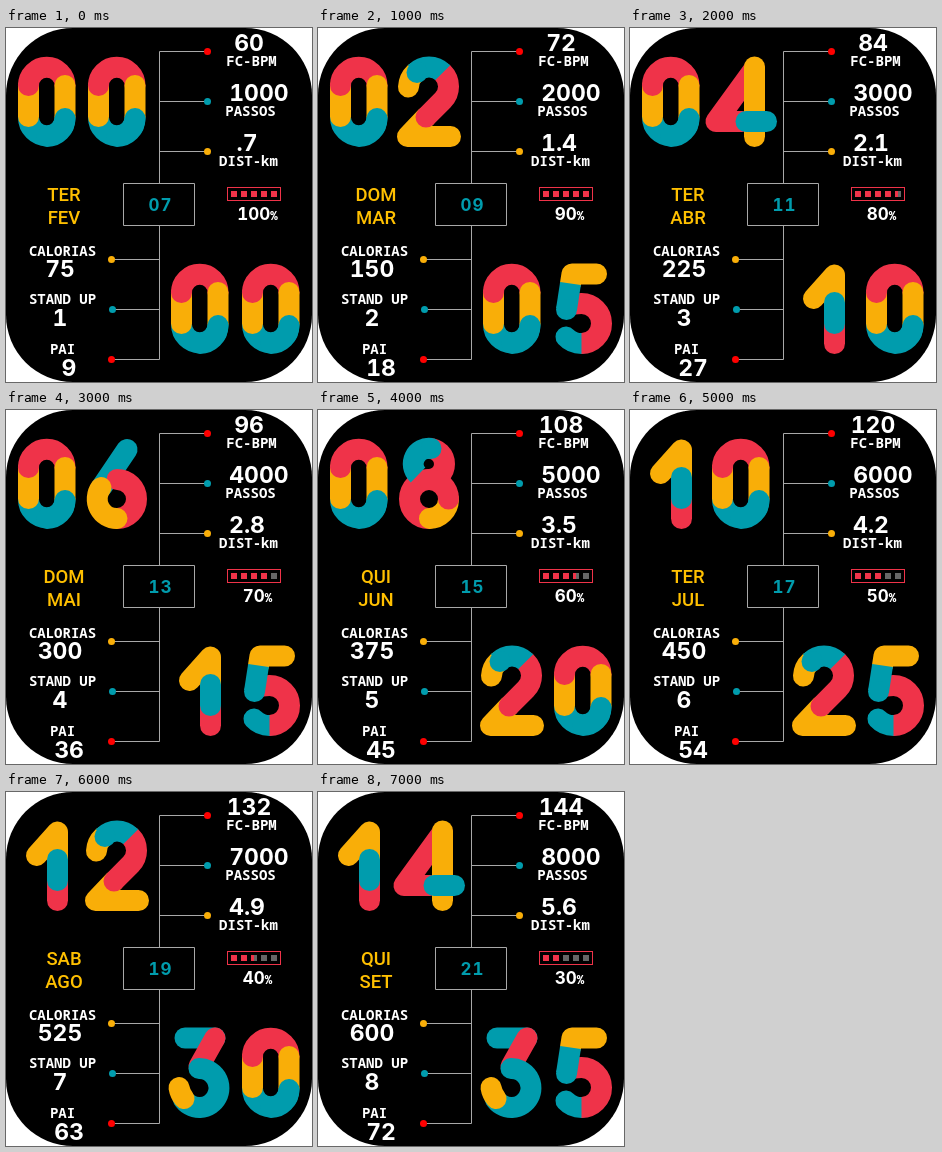
Animation of 306 by 354 pixels, one loop 8 s. Source, as an HTML page:

```html
<!DOCTYPE html>
<html lang="pt">
<head>
<meta charset="utf-8">
<style>
html, body { margin: 0; width: 100%; height: 100%; overflow: hidden; background: #fff; }
svg { display: block; width: 306px; height: 354px; }
text { text-anchor: middle; fill: #fff; }
.label { font: 600 14px "Noto Sans Mono", monospace; }
.num { font: 650 23px Inter, sans-serif; font-feature-settings: "tnum"; }
.day { font: 500 18.5px Roboto, sans-serif; fill: #ffc000; }
.date { font: 650 17px Inter, sans-serif; font-feature-settings: "tnum"; letter-spacing: 1px; fill: #009cad; }
.bat { font: 650 17px Inter, sans-serif; font-feature-settings: "tnum"; }
.pct { font: 700 12.5px "Noto Sans Mono", monospace; }
.big path { fill: none; stroke-width: 21; stroke-linecap: round; stroke-linejoin: round; }
.big .cut { stroke-linecap: butt; }
</style>
</head>
<body>
<svg id="face" viewBox="0 0 306 354">
  <rect width="306" height="354" rx="67"/>
  <path d="M201 23.5H153.5V155M153.5 73.5H201M153.5 123.5H201M106 231.5H153.5M106 281.5H153.5M106 331.5H153.5V198M117.5 155.5h71v42h-71z" fill="none" stroke="#a8a8a8"/>
</svg>
<script>
const NS = "http://www.w3.org/2000/svg";
const face = document.getElementById("face");
const RED = "#ef3349", YELLOW = "#f9ae08", TEAL = "#009cad";
const STEP = 1000, COUNT = 8;

function add(tag, attrs, parent = face) {
  const el = document.createElementNS(NS, tag);
  for (const k in attrs) el.setAttribute(k, attrs[k]);
  parent.append(el);
  return el;
}

function text(x, y, cls, value = "") {
  const el = add("text", { x, y, class: cls });
  el.textContent = value;
  return el;
}

// Coloured strokes of each large numeral, back to front; "cut" gives square ends
const GLYPHS = {
  0: [[TEAL, "M10.5 61a18.25 18.25 0 0 0 36.5 0"], [YELLOW, "M10.5 29V60"],
      [RED, "M10.5 27.5V29a18.25 18.25 0 0 1 36.5 0"], [YELLOW, "M47 29V60"],
      [TEAL, "M29 80a18.25 18.25 0 0 0 18 -18"]],
  1: [[RED, "M39.5 60V80"], [YELLOW, "M18.5 35L39.5 11.5V40"], [TEAL, "M39.5 39V60"]],
  2: [[YELLOW, "M26 60.6L7.5 80H50.5"], [YELLOW, "M8.5 30.5Q9 22 15.2 16.2"],
      [RED, "M42.8 16.2a19.5 19.5 0 0 1 0 27.6L26 60.6"],
      [TEAL, "M15.2 16.2a19.5 19.5 0 0 1 27.6 0", "cut"], [TEAL, "M17 16h0"]],
  3: [[TEAL, "M14 10.5H44"], [RED, "M44 10.5L28 39"],
      [TEAL, "M28 41a19.5 19.5 0 1 1 -16 30"], [YELLOW, "M8 60Q9 66 13 71"]],
  4: [[RED, "M42.5 12L4 65H30"], [YELLOW, "M42.5 10.5V80"], [TEAL, "M34 65H54.5"]],
  5: [[YELLOW, "M16.5 20L18 10.5H42.5"], [TEAL, "M12 73.5Q18 80 27.5 80"],
      [RED, "M13 42Q20 40 27.5 40a20 20 0 0 1 0 40", "cut"],
      [TEAL, "M16.5 20L12.5 46", "cut"], [TEAL, "M12.5 46h0"]],
  6: [[TEAL, "M39 11L14 48"], [RED, "M29 41a19.5 19.5 0 0 1 0 39"],
      [YELLOW, "M29 80a19.5 19.5 0 0 1 -16 -31"]],
  8: [[RED, "M29 10a15.5 15.5 0 0 1 0 31a19.5 19.5 0 0 0 0 39"],
      [YELLOW, "M29.5 80a19.5 19.5 0 0 0 19 -19"],
      [RED, "M29 41a19.5 19.5 0 0 1 19.5 19.5"],
      [TEAL, "M31 10a15.5 15.5 0 0 0 -13 26.5", "cut"], [TEAL, "M31 10h0"]]
};

function drawDigit(group, digit) {
  group.replaceChildren();
  for (const [stroke, d, cls = ""] of GLYPHS[digit]) add("path", { stroke, d, class: cls }, group);
}

for (const [x, y, fill] of [
  [201.5, 23.5, "#f00"], [201.5, 73.5, TEAL], [201.5, 123.5, YELLOW],
  [105.5, 231.5, YELLOW], [106.5, 281.5, TEAL], [105.5, 331.5, "#f00"]
]) add("circle", { cx: x, cy: y, r: 3.5, fill });

text(245.5, 38, "label", "FC-BPM");
text(244.5, 88, "label", "PASSOS");
text(242.5, 138, "label", "DIST-km");
text(56.5, 228, "label", "CALORIAS");
text(56.5, 276, "label", "STAND UP");
text(56.5, 326, "label", "PAI");

add("rect", { x: 221.5, y: 159.5, width: 53, height: 13, fill: "none", stroke: RED });
const cells = [0, 1, 2, 3, 4].map(i => {
  const box = { x: 225 + i * 10, y: 163, width: 6, height: 6 };
  add("rect", { ...box, fill: "#666" });
  return add("rect", { ...box, fill: RED });
});

const digits = [[12, 28.5], [82, 28.5], [165, 235.5], [236, 235.5]].map(([x, y]) =>
  add("g", { class: "big", transform: `translate(${x} ${y})` }));

const heart = text(243, 23, "num"), steps = text(253, 73, "num"), dist = text(241, 123, "num");
const cal = text(54, 249, "num"), stand = text(54, 297.5, "num"), pai = text(63, 348, "num");
const week = text(58, 173, "day"), month = text(58, 196, "day"), date = text(154.5, 183, "date");
const charge = text(251.5, 192, "bat");
const level = add("tspan", {}, charge);
add("tspan", { class: "pct" }, charge).textContent = "%";

const DAYS = ["DOM", "SEG", "TER", "QUA", "QUI", "SEX", "SAB"];
const MONTHS = ["FEV", "MAR", "ABR", "MAI", "JUN", "JUL", "AGO", "SET"];
const pad = n => String(n).padStart(2, "0");

function show(k) {
  const day = 7 + 2 * k, power = 100 - 10 * k;
  [...pad(2 * k) + pad(5 * k)].forEach((d, i) => drawDigit(digits[i], d));
  heart.textContent = 60 + 12 * k;
  steps.textContent = 1000 * (k + 1);
  dist.textContent = (0.7 * (k + 1)).toFixed(1).replace(/^0/, "");
  cal.textContent = 75 * (k + 1);
  stand.textContent = k + 1;
  pai.textContent = 9 * (k + 1);
  week.textContent = DAYS[new Date(2025, k, day).getDay()];
  month.textContent = MONTHS[k];
  date.textContent = pad(day);
  level.textContent = power;
  // The bar fills in half cells
  const full = (power / 10 + 1) / 2;
  cells.forEach((c, i) => c.setAttribute("width", 6 * Math.max(0, Math.min(1, full - i))));
}

let shown = -1;
const start = performance.now();
function tick() {
  const k = Math.floor((performance.now() - start) / STEP) % COUNT;
  if (k !== shown) show(shown = k);
  requestAnimationFrame(tick);
}
tick();
</script>
</body>
</html>
```
